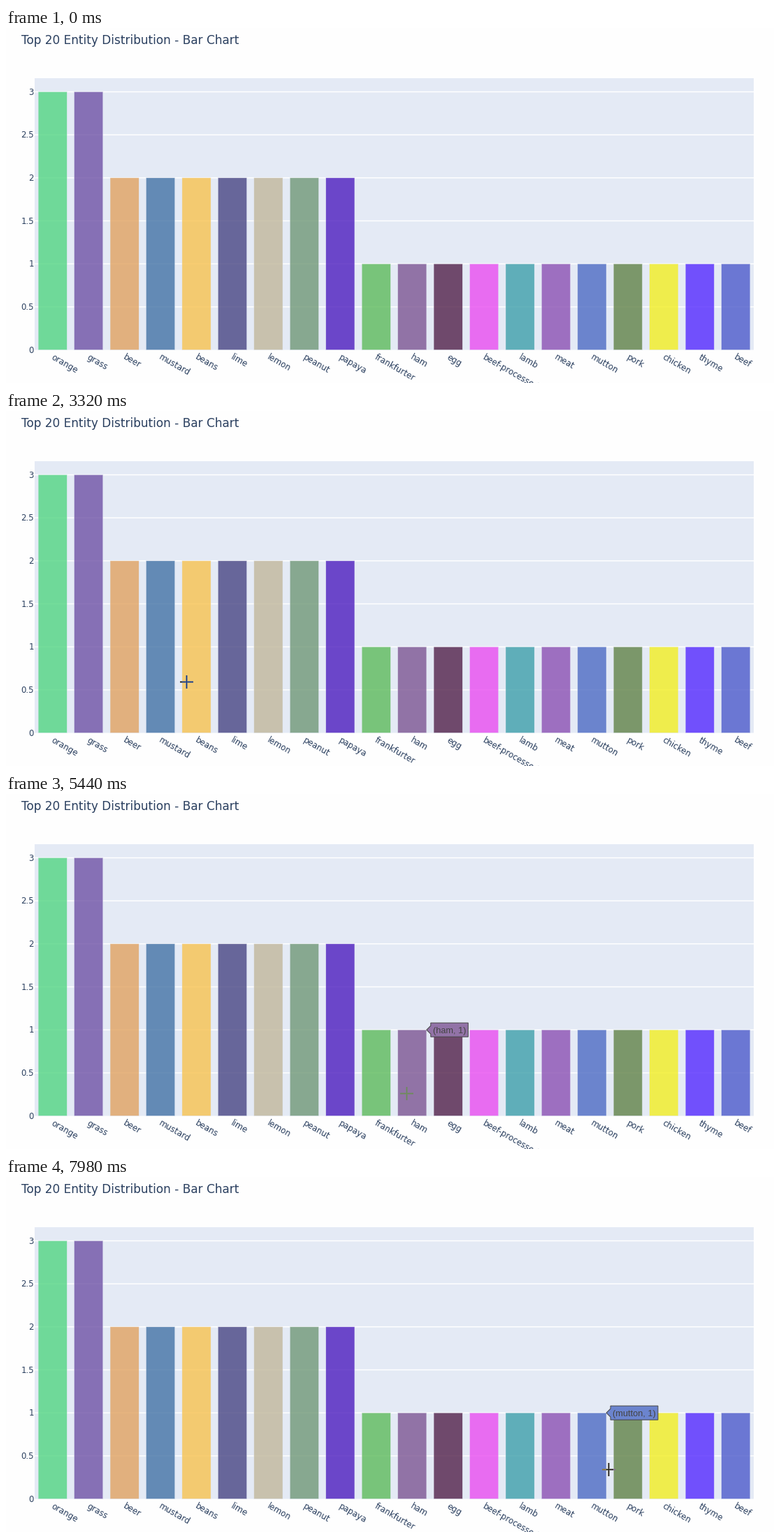
These frames come from a looping animation (1099x509 px, 8000 ms). A matplotlib script:

```python
import numpy as np
import matplotlib.pyplot as plt
from matplotlib.animation import FuncAnimation
from matplotlib.colors import to_rgb
from matplotlib.patches import Polygon, Rectangle

W, H, DPI = 1099, 509, 64
LOOP, STEP = 8000, 20
LEFT, RIGHT, TOP, BASE = 41, 1070, 72, 461.5
UNIT = 123.33           # pixels per count
PAPER, PLOT, INK = "#fefefe", "#e4eaf5", "#2a3f5f"
OPACITY = 0.8

NAMES = ("orange grass beer mustard beans lime lemon peanut papaya frankfurter "
         "ham egg beef-processed lamb meat mutton pork chicken thyme beef").split()
COLORS = ("#6fd999 #8670b6 #e2b07e #638ab5 #f4ca70 #67669a #c8c1ad "
          "#87a890 #6b46ca #78c47a #9273a7 #6f496c #e96cf2 #5faeba "
          "#9d6fc0 #6b84ce #7b976a #efee4c #7150fc #6b77d3").split()
COUNTS = np.repeat([3, 2, 1], [2, 7, 11])
SLOT = (RIGHT - LEFT) / len(NAMES)

# Pointer: where it enters, then its moves as (start ms, end ms, x, y)
ENTRY = 910, 471
MOVES = [
    (110, 270, 222, 366), (570, 1190, 66, 369), (1660, 2460, 180, 382),
    (2480, 3030, 244, 386), (3240, 4000, 328, 397), (4100, 4580, 402, 402),
    (4850, 5620, 592, 432), (6070, 6870, 715, 418), (7080, 7650, 856, 419),
    (7940, 7980, 862, 419),
]
ENTER = MOVES[0][0]
HOVER_LAG = 40


def pt(px):
    return px * 72 / DPI


def level(value):
    return BASE - value * UNIT


def bar_span(i):
    x0 = LEFT + SLOT * (i + 0.1)
    return x0, x0 + SLOT * 0.8


def ease_out(u):
    return 1 - (1 - np.clip(u, 0, 1)) ** 1.6


def pointer(t):
    pos = np.array(ENTRY, float)
    for start, end, x, y in MOVES:
        pos += (np.array([x, y]) - pos) * ease_out((t - start) / (end - start))
    return pos


def hovered(t):
    """Index of the bar under the pointer, or None."""
    if t < ENTER:
        return None
    x, y = pointer(t)
    i = int((x - LEFT) // SLOT)
    x0, x1 = bar_span(i)
    return i if x0 <= x <= x1 and level(COUNTS[i]) <= y <= BASE else None


def contrast(color):
    luma = np.dot(to_rgb(color), (0.299, 0.587, 0.114))
    return "#444444" if luma > 0.5 else "#ffffff"


fig = plt.figure(figsize=(W / DPI, H / DPI), dpi=DPI, facecolor=PAPER)
ax = fig.add_axes([0, 0, 1, 1])
ax.set_xlim(0, W)
ax.set_ylim(H, 0)
ax.axis("off")


def write(x, y, s, px, **kw):
    kw = {"color": INK, "family": "DejaVu Sans", "va": "baseline", **kw}
    return ax.text(x, y, s, fontsize=pt(px), **kw)


def rect(x0, y0, x1, y1, **kw):
    ax.add_patch(Rectangle((x0, y0), x1 - x0, y1 - y0, snap=False, **kw))


# Title, plot area and grid
write(22, 23.2, "Top 20 Entity Distribution - Bar Chart", 16.85)
rect(LEFT, TOP, RIGHT, BASE, fc=PLOT, lw=0)
for value in np.arange(0, 3.5, 0.5):
    y = level(value)
    if value:
        ax.plot([LEFT, RIGHT], [y, y], color="white", lw=pt(1.5), zorder=1,
                snap=False, solid_capstyle="butt")
    write(40, y + 4.2, f"{value:g}", 11.8, ha="right")

# Bars; "backdrop" holds the colour of each pixel column for the pointer
backdrop = np.tile(to_rgb(PLOT), (W, 1))
for i, (name, count, color) in enumerate(zip(NAMES, COUNTS, COLORS)):
    x0, x1 = bar_span(i)
    shown = np.array(to_rgb(color))
    fill = (shown - (1 - OPACITY) * np.array(to_rgb(PLOT))) / OPACITY
    rect(x0, level(count), x1, BASE, fc=np.clip(fill, 0, 1), ec=PLOT,
         lw=pt(0.5), alpha=OPACITY, zorder=2)
    backdrop[round(x0):round(x1)] = shown
    write((x0 + x1) / 2 - 3, 474, name, 11.8, rotation=-30,
          rotation_mode="anchor", ha="left")

# Hover label
box = ax.add_patch(Polygon([(0, 0), (1, 0), (1, 1)], closed=True,
                           lw=pt(1), zorder=4))
tip = write(0, 0, "", 12.75, family="Liberation Sans", zorder=5)

# Cross-hair with soft arms that inverts what lies below it
SIZE = 19
MID = SIZE // 2
arm = np.clip(1.4 - np.abs(np.arange(SIZE) - MID), 0, 1)
cross = np.zeros((SIZE, SIZE, 4))
cross[..., 3] = np.maximum.outer(arm, arm)
cursor = ax.imshow(cross, extent=(0, SIZE, SIZE, 0), aspect="auto",
                   interpolation="nearest", zorder=6)


def place_label(i):
    box.set_visible(i is not None)
    tip.set_visible(i is not None)
    if i is None:
        return
    x, y, line = bar_span(i)[1], level(COUNTS[i]), contrast(COLORS[i])
    tip.set_text(f"({NAMES[i]}, {COUNTS[i]})")
    tip.set_position((x + 9, y + 4.5))
    tip.set_color(line)
    left, right = x + 6, x + 12 + tip.get_window_extent().width
    box.set_xy([(x, y), (left, y - 6), (left, y - 10), (right, y - 10),
                (right, y + 10), (left, y + 10), (left, y + 6)])
    box.set_facecolor(COLORS[i])
    box.set_edgecolor(line)


def place_cursor(t):
    cursor.set_visible(t >= ENTER)
    x, y = np.rint(pointer(t)).astype(int) - MID
    cross[..., :3] = 1 - backdrop[x:x + SIZE]
    cursor.set_data(cross)
    cursor.set_extent((x, x + SIZE, y + SIZE, y))


def update(frame):
    t = frame * STEP
    place_label(hovered(t - HOVER_LAG))
    place_cursor(t)
    return box, tip, cursor


anim = FuncAnimation(fig, update, frames=LOOP // STEP, interval=STEP,
                     repeat=True, repeat_delay=0, blit=False)
plt.show()
```
